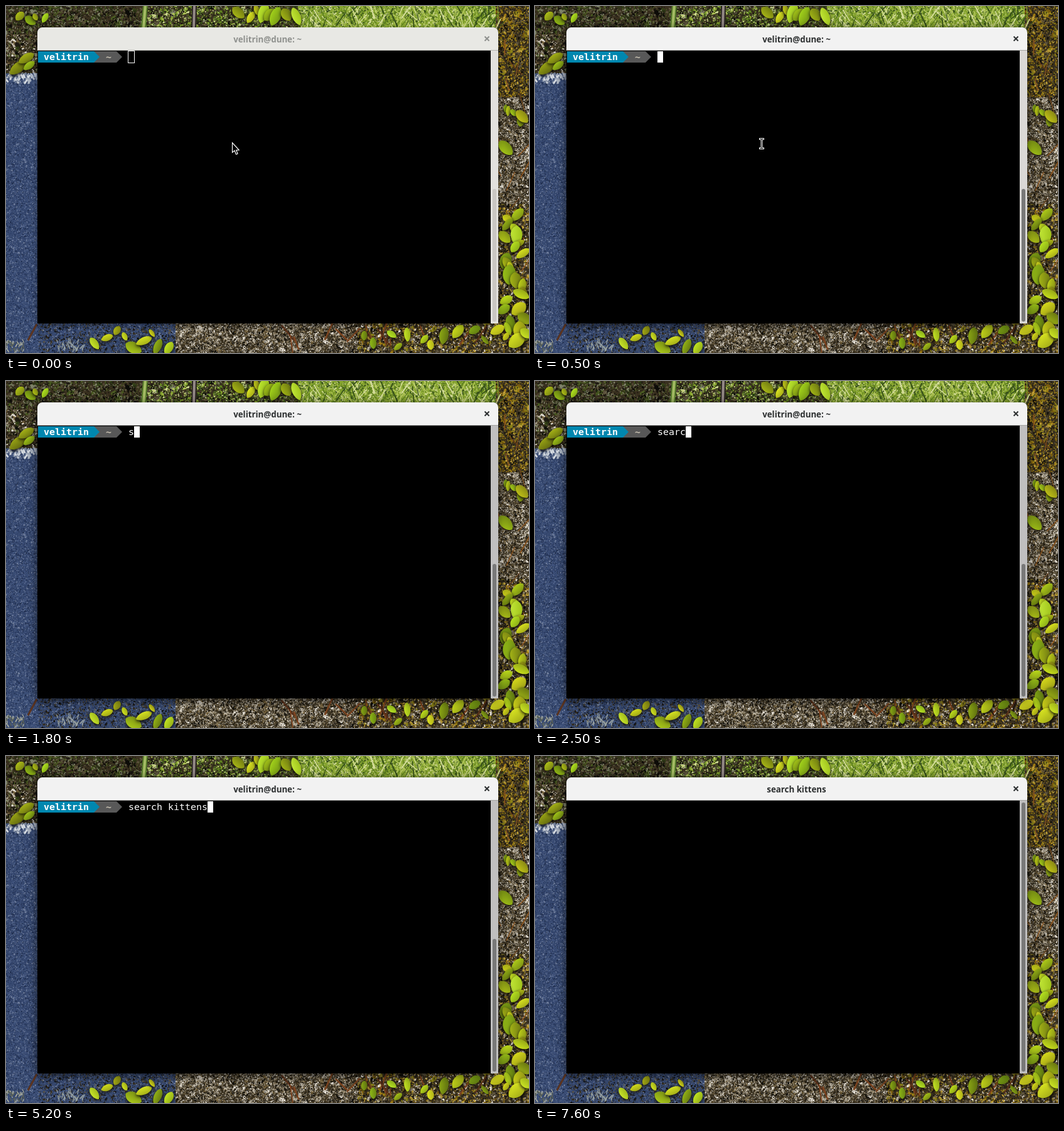
An HTML page with a canvas that plays this animation: 833 by 552 pixels, repeating every 8 s.

```html
<!DOCTYPE html>
<html lang="en">
<head>
<meta charset="utf-8">
<title>Terminal</title>
<style>
  html, body { margin: 0; width: 100%; height: 100%; overflow: hidden; background: #000; }
  canvas { display: block; }
</style>
</head>
<body>
<canvas id="stage" width="833" height="552"></canvas>
<script>
const W = 833, H = 552, LOOP = 8000;
const USER = 'velitrin', HOST = 'dune', COMMAND = 'search kittens';
const WIN = { left: 50, top: 34, right: 784, bottom: 505, header: 36 };
const CELL = 9, ROW = 18, LEFT = 51, TOP = 72, INPUT_X = 195;
const MONO = '14.95px "DejaVu Sans Mono", monospace';
const FOCUS = 500, ENTER = 6100;

// when each character of the command appears
const KEY_TIMES = [1800, 2000, 2100, 2200, 2500, 2700, 3800, 4000, 4300, 4700, 4900, 4900, 5200, 5200];
const CURSOR_OFF = [[1300, 1800], [3200, 3800], [6800, 7000], [7600, LOOP]];

const ctx = document.getElementById('stage').getContext('2d');

let seed = 7;
function random() {
  seed = (seed * 1664525 + 1013904223) >>> 0;
  return seed / 4294967296;
}
const between = (a, b) => a + (b - a) * random();
const pick = list => list[Math.floor(random() * list.length)];

function fillRect(c, color, x, y, w, h) {
  c.fillStyle = color;
  c.fillRect(x, y, w, h);
}

function fillRound(c, color, x, y, w, h, radii) {
  c.fillStyle = color;
  c.beginPath();
  c.roundRect(x, y, w, h, radii);
  c.fill();
}

function fillPath(c, color, points) {
  c.fillStyle = color;
  c.beginPath();
  points.forEach(([x, y]) => c.lineTo(x, y));
  c.closePath();
  c.fill();
}

// A loose impression of stone, moss, grass and leaves around the window
function paintGarden() {
  const canvas = document.createElement('canvas');
  canvas.width = W;
  canvas.height = H;
  const c = canvas.getContext('2d');

  const soil = ['#0d0c08', '#1d1912', '#39301f', '#5d533d'];
  const shade = [...soil, '#2c3815', '#4b5c22', '#7e8268'];
  const moss = [...soil, '#7a5c0e', '#a07c14', '#8a8118', '#c2a33c'];
  const lichen = [...soil, '#8d8370', '#bdb5a4', '#e9e4da', '#77633b'];
  const grass = ['#36501a', '#5f8220', '#87a52f', '#b2c65a', '#d3dc98'];
  const stone = ['#1d2a48', '#2a3b61', '#374970', '#41547d', '#4c5f88', '#7886a3'];

  // Every octave halves the blob size
  function texture(x, y, w, h, colors, size) {
    c.save();
    c.beginPath();
    c.rect(x, y, w, h);
    c.clip();
    fillRect(c, colors[2], x, y, w, h);
    for (let r = size; r >= 0.7; r /= 2) {
      for (let n = w * h / (r * r * 4); n > 0; n--) {
        c.fillStyle = pick(colors);
        c.beginPath();
        c.ellipse(between(x, x + w), between(y, y + h), r, r * between(0.3, 0.8), between(0, 3.14), 0, 7);
        c.fill();
      }
    }
    c.restore();
  }

  function line(color, width, x1, y1, x2, y2) {
    c.strokeStyle = color;
    c.lineWidth = width;
    c.beginPath();
    c.moveTo(x1, y1);
    c.lineTo(x2, y2);
    c.stroke();
  }

  function strokes(x, y, w, h, count, reach, width, colors) {
    for (let i = 0; i < count; i++) {
      const x1 = between(x, x + w), y1 = between(y, y + h);
      line(pick(colors), between(0.5, 1) * width, x1, y1, x1 + between(-0.7, 0.7) * reach, y1 - between(0.5, 1) * reach);
    }
  }

  function leaf(x, y, length) {
    const half = length * between(0.45, 0.75), hue = between(60, 76), light = between(36, 56);
    c.save();
    c.translate(x, y);
    c.rotate(between(-1.2, 1.2));
    c.shadowColor = '#120f06';
    c.shadowBlur = 5;
    c.shadowOffsetY = 2;
    const tone = c.createLinearGradient(-half, 0, half, 0);
    tone.addColorStop(0, `hsl(${hue} 78% ${light}%)`);
    tone.addColorStop(1, `hsl(${hue} 75% ${light - 12}%)`);
    c.fillStyle = tone;
    c.beginPath();
    c.moveTo(0, -length);
    c.bezierCurveTo(half * 1.3, -length * 0.7, half * 1.2, length * 0.6, 0, length);
    c.bezierCurveTo(-half * 1.2, length * 0.6, -half * 1.3, -length * 0.7, 0, -length);
    c.fill();
    c.restore();
  }

  // Spreads leaves evenly along the longer side of the box
  function foliage(x, y, w, h, count, size) {
    for (let i = 0; i < count; i++) {
      const along = (i + random()) / count, across = random();
      const [u, v] = w > h ? [along, across] : [across, along];
      leaf(x + u * w, y + v * h, size * between(0.6, 1.2));
    }
  }

  texture(0, 0, 220, 45, shade, 5);
  texture(220, 0, 245, 45, [...shade, ...grass], 5);
  texture(465, 0, 320, 45, grass, 4);
  texture(780, 0, 53, 145, moss, 5);
  texture(780, 145, 53, 170, lichen, 6);
  texture(780, 315, 53, 237, [...lichen, ...moss], 5);
  texture(0, 45, 52, 62, [...lichen, ...shade], 5);
  texture(0, 107, 52, 445, stone, 1.6);
  texture(52, 500, 220, 52, [...stone, ...soil], 2);
  texture(270, 500, 290, 52, lichen, 6);
  texture(560, 500, 273, 52, [...lichen, ...moss], 5);

  // pale upper edge of the boulder
  strokes(0, 110, 50, 14, 60, 7, 3, ['#aeb7c4', '#d5dae0', '#7b879c']);

  strokes(465, 15, 320, 30, 150, 28, 2, grass);
  strokes(440, 530, 390, 22, 26, 30, 3, ['#5a3019', '#7d4420', '#241811']);
  strokes(788, 60, 40, 440, 14, 34, 2, ['#653c1b', '#8a5420']);
  strokes(82, 535, 42, 16, 30, 10, 1.3, ['#a6afaa']);
  strokes(0, 535, 30, 17, 40, 6, 2, ['#a9ada0', '#5a6258']);

  line('#55792b', 8, 222, -2, 219, 36);
  line('#a4bc64', 4, 222, -2, 219, 36);
  line('#25201d', 8, 300, 0, 299, 36);
  line('#938886', 4, 300, 0, 299, 36);
  line('#5b3420', 3, 49, 506, 35, 532);

  foliage(15, 15, 50, 10, 4, 9);
  foliage(365, 5, 100, 20, 8, 14);
  foliage(14, 82, 28, 18, 3, 15);
  foliage(792, 155, 36, 30, 5, 11);
  foliage(790, 225, 6, 20, 1, 14);
  foliage(792, 325, 36, 215, 26, 14);
  foliage(140, 515, 125, 30, 9, 12);
  foliage(560, 515, 270, 30, 14, 12);
  return canvas;
}

const garden = paintGarden();

function drawWindow(active, entered, fade) {
  const { left, top, right, bottom, header } = WIN;
  const width = right - left, ink = active ? '#2c2f30' : '#8f918e';

  ctx.save();
  ctx.shadowColor = active ? 'rgba(0,0,0,.65)' : 'rgba(0,0,0,.4)';
  ctx.shadowBlur = active ? 16 : 10;
  ctx.shadowOffsetY = 3;
  fillRound(ctx, '#000', left, top, width, bottom - top, [8, 8, 0, 0]);
  ctx.restore();

  fillRound(ctx, active ? '#f2f2f2' : '#e8e8e4', left, top, width, header, [8, 8, 0, 0]);
  fillRect(ctx, active ? '#a3a3a1' : '#b4b4b0', left, top + header, width, 1);

  ctx.fillStyle = ink;
  ctx.font = 'bold 13.3px "Noto Sans", sans-serif';
  ctx.textAlign = 'center';
  ctx.fillText(entered ? COMMAND : `${USER}@${HOST}: ~`, W / 2, 58);
  ctx.textAlign = 'left';

  ctx.strokeStyle = ink;
  ctx.lineWidth = 2;
  ctx.beginPath();
  for (const slope of [-1, 1]) {
    ctx.moveTo(762.5, 52 - 3.5 * slope);
    ctx.lineTo(769.5, 52 + 3.5 * slope);
  }
  ctx.stroke();

  const trough = 226 - 34 * fade, thumbTop = entered ? 74 : 291;
  fillRect(ctx, `rgb(${trough}, ${trough - 2 + fade}, ${trough - 5 + 4 * fade})`, 772, 71, 12, bottom - 71);
  fillRound(ctx, active ? '#787878' : '#c9c6c2', 775, thumbTop, 6, 502 - thumbTop, 3);
}

function drawPrompt(typed) {
  const baseline = TOP + 14;
  const segment = (color, x, end) => fillPath(ctx, color,
    [[x, TOP], [end, TOP], [end + CELL, TOP + ROW / 2], [end, TOP + ROW], [x, TOP + ROW]]);
  const write = (text, color, font, x) => {
    ctx.fillStyle = color;
    ctx.font = font;
    ctx.fillText(text, x, baseline);
  };
  segment('#585858', 140, 176);
  segment('#0087af', LEFT, 140);
  write(USER, '#fff', 'bold ' + MONO, 60);
  write('~', '#c6bfb0', 'bold ' + MONO, 159);
  write(COMMAND.slice(0, typed), '#fff', MONO, INPUT_X);
}

function drawCursor(t, active, x, y) {
  if (!active) {
    ctx.strokeStyle = '#fff';
    ctx.lineWidth = 1;
    ctx.strokeRect(x - 0.5, y - 0.5, CELL + 1, ROW + 1);
  } else if (!CURSOR_OFF.some(([from, to]) => t >= from && t < to)) {
    fillRect(ctx, '#fff', x, y, CELL, ROW);
  }
}

function drawArrow() {
  fillPath(ctx, '#000', [[360.5, 217.5], [360.5, 233], [364, 230], [366.5, 236],
    [369, 235], [366.7, 229.3], [371, 229]]);
  ctx.strokeStyle = '#fff';
  ctx.lineWidth = 1.2;
  ctx.stroke();
}

function drawBeam() {
  for (const [color, grow] of [['#fff', 1], ['#000', 0]]) {
    const bar = (x, y, w, h) => fillRect(ctx, color, x - grow, y - grow, w + 2 * grow, h + 2 * grow);
    bar(358, 211, 6, 1);
    bar(358, 226, 6, 1);
    bar(360.5, 211, 1, 16);
  }
}

function draw(time) {
  const t = Math.floor((time % LOOP) / 100) * 100;
  const active = t >= FOCUS, entered = t >= ENTER;
  const typed = KEY_TIMES.filter(at => at <= t).length;
  const fade = Math.min(1, Math.max(0, (t - 400) / 400));

  ctx.drawImage(garden, 0, 0);
  drawWindow(active, entered, fade);
  if (entered) {
    drawCursor(t, active, LEFT, TOP + ROW);
  } else {
    drawPrompt(typed);
    drawCursor(t, active, INPUT_X + typed * CELL, TOP);
  }
  if (t < 100) drawArrow();
  else if (!typed) drawBeam();
}

const start = performance.now();
function tick() {
  draw(performance.now() - start);
  requestAnimationFrame(tick);
}
tick();
</script>
</body>
</html>
```
